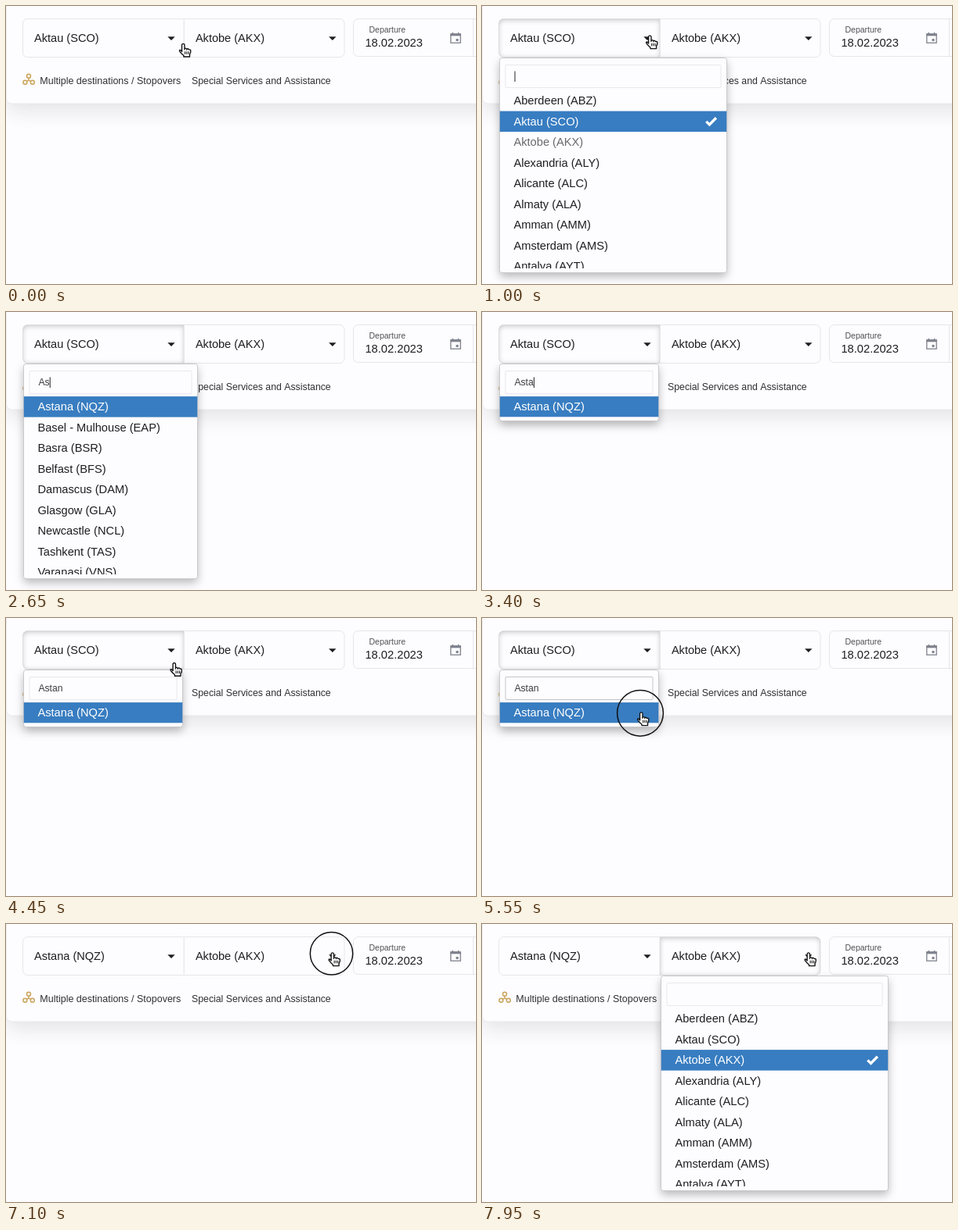
These frames come from a looping animation (600 by 356 pixels, 8 s). An HTML page with a canvas:

```html
<!DOCTYPE html>
<html lang="en">
<head>
<meta charset="utf-8">
<title>Flight search</title>
<style>
  html, body { margin: 0; width: 100%; height: 100%; overflow: hidden; background: #fdfcfe; }
  canvas { display: block; width: 100vw; height: 100vh; }
</style>
</head>
<body>
<canvas id="stage" width="600" height="356"></canvas>
<script>
const ctx = document.getElementById('stage').getContext('2d');
const LOOP = 8000;
const BG = '#fdfcfe', INK = '#1e1e21', BORDER = '#e6e5e9', BLUE = '#387dc1';
const MENU_TOP = 66.5, ROW_TOP = 108.1, ROW = 26.5, LIST_END = 336;

const ALL = ['Aberdeen (ABZ)', 'Aktau (SCO)', 'Aktobe (AKX)', 'Alexandria (ALY)', 'Alicante (ALC)',
  'Almaty (ALA)', 'Amman (AMM)', 'Amsterdam (AMS)', 'Antalya (AYT)'];
const AS = ['Astana (NQZ)', 'Basel - Mulhouse (EAP)', 'Basra (BSR)', 'Belfast (BFS)', 'Damascus (DAM)',
  'Glasgow (GLA)', 'Newcastle (NCL)', 'Tashkent (TAS)', 'Varanasi (VNS)'];
const AST = ['Astana (NQZ)', 'Belfast (BFS)', 'Newcastle (NCL)'];

// States of the origin menu, from the given time on
const ORIGIN = [
  { at: 600, typed: '', items: ALL, width: 290, active: 1, checked: 1, disabled: 2, blink: 750 },
  { at: 2300, typed: 'A', items: ALL, width: 290, active: 0, checked: 1, disabled: 2 },
  { at: 2600, typed: 'As', items: AS, width: 222, active: 0 },
  { at: 2900, typed: 'Ast', items: AST, width: 203, active: 0 },
  { at: 3150, typed: 'Asta', items: AST.slice(0, 1), width: 203, active: 0 },
  { at: 3600, typed: 'Astan', items: AST.slice(0, 1), width: 203, active: 0 }
];
const PICKED = 5600;
const DESTINATION = { at: 7200, typed: '', items: ALL, width: 290, active: 2, checked: 2, blink: 7350 };

const CLICKS = [300, 5300, 6900], CLICK_TIME = 400;
const HIDDEN = [2300, 4300];  // the pointer hides while typing
const POINTER = [
  [0, 225.5, 49], [50, 222, 46], [150, 213.5, 38.5], [4300, 213.5, 38.5], [4450, 214, 58],
  [4750, 206, 105], [5050, 202.5, 121.5], [5700, 202.5, 121.5], [5950, 246, 119],
  [6150, 317.5, 89.5], [6400, 392, 51], [6600, 416, 37.5], [LOOP, 416, 37.5]
];
const HAND = new Path2D('M-1.6 9.2V1A1.6 1.6 0 0 1 1.6 1V5.6Q3 4.2 4.3 6Q5.8 4.9 6.8 6.8Q9 6.2 9 8.5' +
  'Q9 11 7.8 12.5V15.6H.6V14Q-1.5 12.5 -3.5 9.8C-5.8 7.2 -3.5 6 -1.6 9.2Z');
const FINGERS = new Path2D('M2.2 9V12.4M4.3 9V12.4M6.4 9V12.4M1.6 5.6V7.4M4.3 6V7.6');

function text(string, x, y, size, color = INK) {
  ctx.font = `${size}px "Liberation Sans", Arial, sans-serif`;
  ctx.fillStyle = color;
  ctx.fillText(string, x, y);
}

function box(x, y, w, h, radius, fill, stroke) {
  ctx.beginPath();
  ctx.roundRect(x, y, w, h, radius);
  if (fill) { ctx.fillStyle = fill; ctx.fill(); }
  if (stroke) { ctx.strokeStyle = stroke; ctx.lineWidth = 1; ctx.stroke(); }
}

function withShadow(color, blur, offsetY, draw) {
  ctx.save();
  Object.assign(ctx, { shadowColor: color, shadowBlur: blur, shadowOffsetY: offsetY });
  draw();
  ctx.restore();
}

function line(color, width, ...points) {
  ctx.beginPath();
  points.forEach(([x, y]) => ctx.lineTo(x, y));
  ctx.strokeStyle = color;
  ctx.lineWidth = width;
  ctx.stroke();
}

function field(x, w, label, radius, open) {
  box(x, 16.5, w, 49, radius, BG, BORDER);
  if (open) {
    ctx.save();
    ctx.clip();
    withShadow('rgba(0,0,0,.2)', 6, 2, () => {
      ctx.beginPath();
      ctx.rect(x - 20, 0, w + 40, 90);
      ctx.roundRect(x, 16.5, w, 49, radius);
      ctx.fillStyle = BORDER;
      ctx.fill('evenodd');
    });
    ctx.restore();
  }
  text(label, x + 14.6, 46.2, 14.55);
  const arrow = x + 189.5;
  ctx.beginPath();
  ctx.moveTo(arrow - 4.7, 39.2);
  ctx.lineTo(arrow + 4.7, 39.2);
  ctx.lineTo(arrow, 44);
  ctx.fill();
}

function calendar() {
  const gray = '#7f838d';
  ctx.strokeStyle = gray;
  ctx.lineWidth = 1.3;
  ctx.strokeRect(567.8, 35.8, 12.4, 11.4);
  ctx.fillStyle = gray;
  ctx.fillRect(567.5, 35.5, 13, 2.8);
  ctx.fillRect(569.6, 33.8, 1.5, 2.5);
  ctx.fillRect(576.8, 33.8, 1.5, 2.5);
  ctx.fillRect(574.5, 42, 3, 3);
}

function stopoverIcon() {
  const gold = '#c9a257', hub = [29, 95];
  [[29, 89.8], [24.4, 97.8], [33.8, 97.8]].forEach(([x, y]) => {
    line(gold, 1.4, hub, [x, y]);
    ctx.beginPath();
    ctx.arc(x, y, 2.5, 0, 7);
    ctx.fillStyle = BG;
    ctx.fill();
    ctx.stroke();
  });
}

function page(t, originOpen, destinationOpen) {
  ctx.fillStyle = BG;
  ctx.fillRect(0, 0, 600, 356);
  withShadow('rgba(40,40,50,.12)', 26, 9, () => box(.5, -20, 640, 145, 7, BG));
  box(.5, -20, 640, 145, 7, BG, '#ebeaed');

  field(21.5, 205.8, t < PICKED ? 'Aktau (SCO)' : 'Astana (NQZ)', [6, 0, 0, 6], originOpen);
  field(227.3, 204.7, 'Aktobe (AKX)', [0, 6, 6, 0], destinationOpen);

  box(443.5, 16.5, 170, 48, 6, BG, BORDER);
  line(BORDER, 1, [596.5, 16.5], [596.5, 64.5]);
  text('Departure', 463.5, 34.2, 10.5, '#505056');
  text('18.02.2023', 458.4, 51.8, 14.7);
  calendar();

  stopoverIcon();
  text('Multiple destinations / Stopovers', 43.3, 99.8, 12.5, '#303034');
  text('Special Services and Assistance', 237, 99.8, 12.3, '#303034');
}

function menu(x, state, t) {
  const { typed, items, width, active, checked, disabled, at, blink = at } = state;
  const bottom = Math.min(LIST_END, ROW_TOP + items.length * ROW);
  const height = Math.floor(bottom + 5) + .5 - MENU_TOP;
  withShadow('rgba(0,0,0,.28)', 12, 5, () => box(x, MENU_TOP, width, height, 3, BG));
  box(x, MENU_TOP, width, height, 3, BG, '#c9c8cb');

  box(x + 7.5, 75.5, width - 15, 29, 1, BG, t > 5150 && t < PICKED ? '#c4c4c8' : '#e9e8eb');
  text(typed, x + 18.9, 94.4, 12.2, '#3c3c3c');
  if (t >= blink && (t - blink) % 1000 < 500) {
    const caret = x + 19.5 + ctx.measureText(typed).width;
    line('#222', 1, [caret, 83.5], [caret, 97]);
  }

  ctx.save();
  ctx.beginPath();
  ctx.rect(x, MENU_TOP, width, bottom - MENU_TOP);
  ctx.clip();
  items.forEach((item, i) => {
    const top = ROW_TOP + i * ROW;
    const color = i === active ? '#fff' : i === disabled ? '#69696c' : INK;
    if (i === active) {
      ctx.fillStyle = BLUE;
      ctx.fillRect(x, top, width, ROW);
    }
    text(item, x + 17.9, top + 18.1, 14.67, color);
    if (i === checked) {
      const cx = x + width - 27, cy = top + 13.1;
      line(color, 3.4, [cx + .8, cy + .2], [cx + 4.9, cy + 4.2], [cx + 13.4, cy - 4.4]);
    }
  });
  ctx.restore();
}

function pointerAt(t) {
  const i = POINTER.findIndex(key => key[0] > t);
  const [t0, x0, y0] = POINTER[i - 1], [t1, x1, y1] = POINTER[i];
  const k = (t - t0) / (t1 - t0);
  return [x0 + (x1 - x0) * k, y0 + (y1 - y0) * k];
}

function hand() {
  ctx.save();
  ctx.translate(.8, 0);
  ctx.scale(1.06, 1.03);
  ctx.lineJoin = 'round';
  ctx.fillStyle = '#fff';
  ctx.lineWidth = 1.3;
  ctx.fill(HAND);
  ctx.stroke(HAND);
  ctx.lineWidth = 1;
  ctx.stroke(FINGERS);
  ctx.restore();
}

function pointer(t) {
  if (t >= HIDDEN[0] && t < HIDDEN[1]) return;
  ctx.save();
  ctx.translate(...pointerAt(t));
  ctx.strokeStyle = '#111';
  hand();

  const start = CLICKS.find(c => t >= c && t < c + CLICK_TIME);
  if (start !== undefined) {
    const k = (t - start) / CLICK_TIME;
    ctx.globalAlpha = Math.min(1, (1 - k) * 4);
    ctx.beginPath();
    ctx.arc(-.5, .3, 31 * (1 - (1 - k) ** 3), 0, 7);
    ctx.lineWidth = 1.5;
    ctx.stroke();
  }
  ctx.restore();
}

function draw(now) {
  const t = now % LOOP;
  const origin = t < PICKED && ORIGIN.findLast(state => t >= state.at);
  const destinationOpen = t >= DESTINATION.at;
  page(t, !!origin, destinationOpen);
  if (origin) menu(22.5, origin, t);
  if (destinationOpen) menu(228.5, DESTINATION, t);
  pointer(t);
}

const begin = performance.now();
function tick() {
  draw(performance.now() - begin);
  requestAnimationFrame(tick);
}
tick();
</script>
</body>
</html>
```
